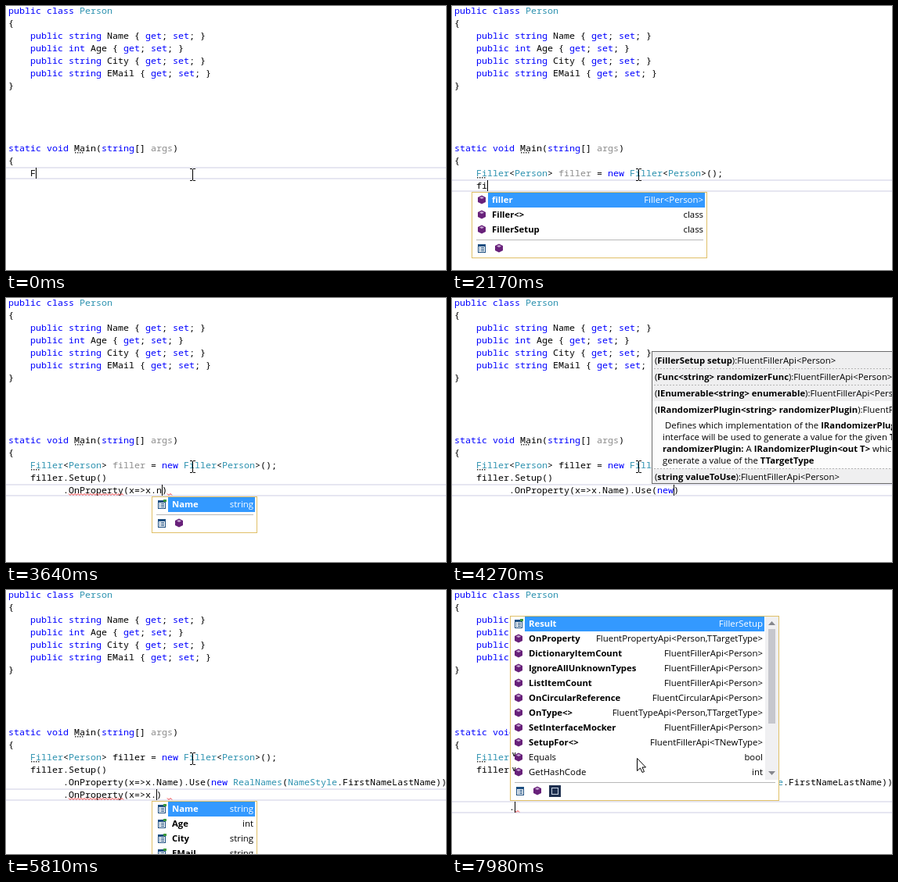
These frames come from a looping animation (562x338 px, 8000 ms). An HTML page with a canvas:

```html
<!DOCTYPE html>
<html lang="en">
<head>
<meta charset="utf-8">
<title>Typing a fluent setup</title>
<style>
html, body { margin: 0; width: 100%; height: 100%; overflow: hidden; background: #fff; }
canvas { display: block; }
</style>
</head>
<body>
<canvas id="stage" width="562" height="338"></canvas>
<script>
const ctx = document.getElementById('stage').getContext('2d');
const LOOP = 8000, CHAR = 7, LEFT = 3, LINE = 16;
const CODE_FONT = '11.667px "Noto Sans Mono", "DejaVu Sans Mono", monospace';
const UI_FONT = '11.4px "Open Sans", "Noto Sans", sans-serif';
const UI_BOLD = 'bold 11.3px "Open Sans", "Noto Sans", sans-serif';
const KEYWORDS = /^(public|class|string|int|get|set|static|void|new)$/;
const TYPES = /^(Person|Filler|RealNames|NameStyle|IntRange)$/;
const MOUSE = { x: 238, y: 216 };
const RESOLVED = 2660, USED = 4060;

const colX = col => LEFT + col * CHAR;
const lineTop = line => line * LINE - 2;

const fixedLines = [
  'public class Person', '{',
  '    public string Name { get; set; }',
  '    public int Age { get; set; }',
  '    public string City { get; set; }',
  '    public string EMail { get; set; }',
  '}', '', '', '', '',
  'static void Main(string[] args)', '{'
];

// ---- typing: each step sets one line as text before and after the caret
const steps = [];
const put = (t, line, pre, post = '') => steps.push({ t, line, pre, post });
function type(t, line, pre, typed, post = '') {
  for (let i = 1; i <= typed.length; i++) put(t + (i - 1) * 70, line, pre + typed.slice(0, i), post);
}

const IN = ' '.repeat(4), DEEP = ' '.repeat(10);
const decl = IN + 'Filler<Person> filler =';
put(0, 13, IN + 'F');
type(70, 13, IN + 'F', 'iller');
put(420, 13, IN + 'Filler<', '>');
type(490, 13, IN + 'Filler<', 'Per', '>');
put(700, 13, IN + 'Filler<Person', '>');
put(770, 13, IN + 'Filler<Person>');
type(840, 13, IN + 'Filler<Person>', ' filler =');
put(1470, 13, decl + ' ');
put(1540, 13, decl + ' ne');
put(1610, 13, decl + ' new ');
put(1680, 13, decl + ' new Filler<Person>');
put(1750, 13, decl + ' new Filler<Person>(', ')');
put(1820, 13, decl + ' new Filler<Person>()');
put(1890, 13, decl + ' new Filler<Person>();');
put(1960, 14, IN);
type(2100, 14, IN, 'fil');
put(2310, 14, IN + 'filler.');
put(2380, 14, IN + 'filler.S');
put(2450, 14, IN + 'filler.Setup');
put(2520, 14, IN + 'filler.Setup(', ')');

const onProp = DEEP + '.OnProperty(';
put(2660, 15, DEEP);
put(2730, 15, DEEP + '.');
put(2800, 15, DEEP + '.On');
put(2870, 15, DEEP + '.OnProperty');
put(2940, 15, onProp, ')');
type(3150, 15, onProp, 'x=>x', ')');
put(3570, 15, onProp + 'x=>x.', ')');
put(3640, 15, onProp + 'x=>x.n', ')');
put(3710, 15, onProp + 'x=>x.na', ')');
put(3780, 15, onProp + 'x=>x.Name', ')');
const name = onProp + 'x=>x.Name)', useName = name + '.Use(';
put(3850, 15, name);
put(3920, 15, name + '.');
put(3990, 15, name + '.U');
put(4060, 15, useName, ')');
type(4130, 15, useName, 'new ', ')');
type(4410, 15, useName + 'new ', 'Re', ')');
put(4550, 15, useName + 'new RealNames', ')');
put(4620, 15, useName + 'new RealNames(', '))');
put(4690, 15, useName + 'new RealNames(N', '))');
put(4760, 15, useName + 'new RealNames(NameStyle', '))');
put(4830, 15, useName + 'new RealNames(NameStyle.', '))');
put(4900, 15, useName + 'new RealNames(NameStyle.FirstNameLastName', '))');
put(5040, 15, useName + 'new RealNames(NameStyle.FirstNameLastName))');

put(5180, 16, DEEP);
type(5250, 16, DEEP, '.On');
put(5460, 16, onProp, ')');
type(5530, 16, onProp, 'x=>x.a', ')');
const age = onProp + 'x=>x.Age)', useAge = age + '.Use(';
put(5950, 16, onProp + 'x=>x.Age', ')');
put(6020, 16, age);
type(6090, 16, age, '.U');
put(6230, 16, age + '.Use');
put(6300, 16, useAge, ')');
type(6510, 16, useAge, 'new ', ')');
put(6930, 16, useAge + 'new I', ')');
put(7000, 16, useAge + 'new Int', ')');
put(7070, 16, useAge + 'new IntRange', ')');
put(7140, 16, useAge + 'new IntRange(', '))');
type(7210, 16, useAge + 'new IntRange(', '10,32', '))');
put(7630, 17, DEEP);
put(7770, 17, DEEP + '.');

// ---- completion lists: name | type | icon
const rows = text => text.split('\n').map(r => r.split('|'));
const api = 'FluentFillerApi<Person>';
const objectRows = '\nEquals|bool|v\nGetHashCode|int|v';
const members = rows(`Result|FillerSetup|p
OnProperty|FluentPropertyApi<Person,TTargetType>
DictionaryItemCount|${api}
IgnoreAllUnknownTypes|${api}
ListItemCount|${api}
OnCircularReference|FluentCircularApi<Person>
OnType<>|FluentTypeApi<Person,TTargetType>
SetInterfaceMocker|${api}
SetupFor<>|FluentFillerApi<TNewType>${objectRows}`);
const onMembers = members.filter(r => r[0].startsWith('On'));
const typeRows = rows('Filler<>|class\nFillerSetup|class\nFillerSetupItem|class\nFile|class\nFileAccess|enum\nFileInfo|class');
const personTypes = rows('Person|class\nPredicate<>|delegate\nProgress<>|class\nProgram|class\nProperty|class\nPath|class');
const newRows = rows('Filler<Person>|class\nPerson|class\nFillerSetup|class\nObject|class\nRandom|class\nString|class');
const fillerRows = rows('Setup|' + api + '\nCreate|Person\nFill|Person' + objectRows + '\nGetType|Type|v');
const personRows = rows('Name|string|p\nAge|int|p\nCity|string|p\nEMail|string|p');
const useRows = rows('Use|' + api + '\nDoIt|FluentPropertyApi\nIgnoreIt|' + api + objectRows + '\nGetType|Type|v\nToString|string|v');
const nameRows = rows('RealNames|class\nRandom|class\nRandomizer<>|class\nRange|class');
const intRows = rows('IntRange|class\nInt32|struct\nIntPtr|struct');

function list(t0, t1, line, col, items, opt = {}) {
  const h = items.length * 19 + 28, top = lineTop(line);
  return { t0, t1, x: colX(col) - 6, y: opt.below ? top + LINE : top - h, w: opt.w || 134, h, items, ...opt, draw: drawList };
}

// ---- signature tips; asterisks switch bold
const signatures = T => [
  'FillerSetup setup', `Func<${T}> randomizerFunc`, `IEnumerable<${T}> enumerable`,
  `IRandomizerPlugin<${T}> randomizerPlugin`, `${T} valueToUse`
].map(s => `(*${s}*):${api}`);
const pluginNote = [
  ' Defines which implementation of the *IRandomizerPlugin*',
  'interface will be used to generate a value for the given *TTargetType*',
  '*randomizerPlugin:* A *IRandomizerPlugin<out T>* which will be used to',
  'generate a value of the *TTargetType*'];
const valueNote = [
  ' Defines which static value will be used for the given *TTargetType*',
  '*valueToUse:* Value which will be used'];
const propSig = ['(*Expression<Func<Person,TTargetType>> property*, *params Expression[] more*)'];
const propNote = [
  ' Starts to configure the behaviour of a *property*',
  '*property:* The property which will be configured',
  '*more:* Some more properties which should be',
  'configured the same way',
  '*returns:* FluentPropertyApi<Person,TTargetType>'];

function tip(t0, t1, line, col, sigs, open, note) {
  const h = sigs.length * 21 + note.length * 15 + 5;
  return { t0, t1, x: colX(col), y: lineTop(line) - h, w: 420, h, sigs, open, note, draw: drawTip };
}
const nameTip = (t0, t1) => tip(t0, t1, 15, 36, signatures('string'), 3, pluginNote);
const ageTip = (t0, t1) => tip(t0, t1, 16, 35, signatures('int'), 4, valueNote);
const full = { w: 343, scroll: true };

const popups = [
  list(70, 420, 13, 4, typeRows, { below: true, w: 380 }),
  list(490, 700, 13, 11, personTypes, { below: true, w: 440 }),
  list(1610, 1680, 13, 32, newRows, { below: true, w: 264 }),
  list(2100, 2310, 14, 4, rows('filler|Filler<Person>\nFiller<>|class\nFillerSetup|class'), { below: true, w: 300 }),
  list(2310, 2450, 14, 11, fillerRows, { below: true, w: 301 }),
  list(2730, 2800, 15, 11, members, full),
  list(2800, 2870, 15, 11, onMembers, { w: 343 }),
  tip(2940, 3430, 15, 20, propSig, 0, propNote),
  list(3570, 3640, 15, 27, personRows, { below: true }),
  list(3640, 3780, 15, 27, personRows.slice(0, 1), { below: true }),
  list(3920, 4060, 15, 33, useRows, { w: 260 }),
  nameTip(4060, 4410),
  list(4410, 4550, 15, 41, nameRows, { w: 262 }),
  nameTip(4550, 5110),
  list(5250, 5320, 16, 11, members, full),
  list(5320, 5460, 16, 11, onMembers, { w: 343 }),
  tip(5460, 5740, 16, 20, propSig, 0, propNote),
  list(5810, 5880, 16, 27, personRows, { below: true }),
  list(5880, 5950, 16, 27, personRows.slice(1, 2), { below: true }),
  list(6090, 6300, 16, 32, useRows, { w: 260 }),
  ageTip(6300, 6930),
  list(6930, 7070, 16, 40, intRows, { w: 220 }),
  ageTip(7070, 7490),
  list(7840, LOOP, 17, 11, members, full)
];

// start, end, line, column, length
const squiggles = [
  [2870, 3850, 15, 11, 10], [3570, 3780, 15, 29, 1],
  [5460, 5950, 16, 11, 10], [5810, 5950, 16, 29, 1],
  [6510, 6930, 16, 36, 4], [6510, 6930, 16, 41, 1],
  [7770, LOOP, 17, 11, 1]
];
// start, end, line, columns of the brace pair
const braces = [[2520, 2660, 14, 16, 17], [4900, 5110, 15, 36, 79]];
const caretOff = [[1330, 1470], [4900, 5040]];
const during = (t, a, b) => t >= a && t < b;

// ---- drawing
function box(x, y, w, h, color) {
  ctx.fillStyle = color;
  ctx.fillRect(x, y, w, h);
}
function frame(x, y, w, h, color) {
  ctx.strokeStyle = color;
  ctx.lineWidth = 1;
  ctx.strokeRect(x + .5, y + .5, w - 1, h - 1);
}
function poly(points, fill, stroke) {
  ctx.beginPath();
  points.forEach(([x, y]) => ctx.lineTo(x, y));
  ctx.closePath();
  ctx.fillStyle = fill;
  ctx.fill();
  if (stroke) { ctx.strokeStyle = stroke; ctx.lineWidth = 1; ctx.stroke(); }
}
function label(s, x, y, color = '#000', font = UI_FONT, align = 'left') {
  ctx.font = font;
  ctx.textAlign = align;
  ctx.fillStyle = color;
  ctx.fillText(s, x, y);
}

function wordColor(word, line, t) {
  if (KEYWORDS.test(word)) return '#0000ff';
  if (TYPES.test(word)) return '#2b91af';
  if (word === 'args' || (word === 'filler' && line === 13 && t < USED)) return '#8c8c8c';
  if (word === 'filler' && t < RESOLVED) return '#f00';
  return '#000';
}
function codeLine(text, line, t) {
  for (const m of text.matchAll(/\w+|[^\w\s]+/g))
    label(m[0], colX(m.index), line * LINE + 10, wordColor(m[0], line, t), CODE_FONT);
}
function dots(x, y) {
  for (let i = 0; i < 4; i++) box(x + i * 3, y, 1.5, 1.5, '#333');
}
function squiggle(x, y, w) {
  ctx.beginPath();
  for (let i = 0; i <= w; i += 2) ctx.lineTo(x + i, y + (i % 4 ? 2 : 0));
  ctx.strokeStyle = '#f03030';
  ctx.lineWidth = 1;
  ctx.stroke();
}

function cube(x, y) {
  poly([[x, y - 5.5], [x + 5, y - 3], [x + 5, y + 3], [x, y + 5.5], [x - 5, y + 3], [x - 5, y - 3]], '#68217a');
  poly([[x, y - 4], [x + 3, y - 2.5], [x, y - 1], [x - 3, y - 2.5]], '#c9a9d3');
}
function sheet(x, y) {
  box(x - 5, y - 5, 10, 11, '#fff');
  frame(x - 5, y - 5, 10, 11, '#1c4e80');
  box(x - 5, y - 5, 10, 3, '#1c4e80');
  for (let i = 0; i < 3; i++) {
    box(x - 3, y - 1 + i * 2, 1, 1, '#1c4e80');
    box(x - 1, y - 1 + i * 2, 4, 1, '#1c4e80');
  }
}
function rowIcon(kind, x, y) {
  if (kind === 'p') {
    sheet(x, y);
    box(x + 2, y - 6, 4, 3, '#3c9a3c');
    return;
  }
  cube(x, y);
  if (kind === 'v') label('v', x - 8, y - 1, '#222', 'bold 8px "Open Sans", sans-serif');
}

function drawList(p) {
  const { x, y, w, h, items, scroll } = p;
  const pad = scroll ? 0 : 2, right = x + w - (scroll ? 20 : 4);
  box(x, y, w, h, '#fff');
  frame(x, y, w + 1, h, '#e0c068');
  items.forEach(([text, kind, icon], i) => {
    const cy = y + 10 + i * 19, ink = i ? '#000' : '#fff';
    if (!i) box(x + 19 + pad, y + 1, right + 2 - x - 19 - pad, 19, '#3399ff');
    rowIcon(icon, x + 11 + pad, cy);
    label(text, x + 24 + pad, cy + 4, ink, icon === 'v' ? UI_FONT : UI_BOLD);
    label(kind, right, cy + 4, ink, UI_FONT, 'right');
  });
  const foot = y + items.length * 19;
  box(x + 6, foot + 4, w - 10, 1, '#b8b8b8');
  sheet(x + 13, foot + 15);
  cube(x + 35, foot + 15);
  if (!scroll) return;
  box(x + 50, foot + 8, 15, 15, '#1f3050');
  frame(x + 53, foot + 11, 9, 9, '#c8d4e4');
  const sx = x + w - 17;
  box(sx, y + 1, 17, items.length * 19, '#f0f0f2');
  box(sx + 4, y + 17, 9, 121, '#c6c7cd');
  const up = y + 9, down = y + items.length * 19 - 7, mid = sx + 8.5;
  poly([[mid - 4.5, up + 3], [mid + 4.5, up + 3], [mid, up - 2]], '#85868c');
  poly([[mid - 4.5, down - 3], [mid + 4.5, down - 3], [mid, down + 2]], '#85868c');
}

function rich(text, x, y) {
  text.split('*').forEach((part, i) => {
    label(part, x, y, '#000', i % 2 ? UI_BOLD : UI_FONT);
    x += ctx.measureText(part).width;
  });
}
function drawTip({ x, y, w, h, sigs, open, note }) {
  box(x, y, w, h, '#efeff0');
  let cy = y + 12;
  sigs.forEach((sig, i) => {
    const tall = i === open ? note.length * 15 + 5 : 0;
    if (tall) box(x, cy - 11, w, Math.min(21 + tall, y + h - cy + 11), '#fcfcfc');
    rich(sig, x + 4, cy + 3.5);
    cy += 21;
    if (tall) {
      note.forEach((s, n) => rich(s, x + 14, cy + n * 15 + 3));
      cy += tall;
    }
    if (i < sigs.length - 1)
      for (let dx = 3; dx < w; dx += 4) box(x + dx, cy - 11, 2, 1, '#b4b4b4');
  });
  frame(x, y, w, h, '#6c6c6c');
}

function drawMouse(overList) {
  if (overList) {
    const shape = [[0, 0], [0, 16], [4, 12.5], [6.5, 18], [9, 17], [6.5, 11.5], [11, 11.5]];
    poly(shape.map(([x, y]) => [x + 236.5, y + 215.5]), '#fff', '#000');
    return;
  }
  const { x, y } = MOUSE;
  box(x, y - 7, 1, 14, '#000');
  for (const cy of [y - 8, y + 7]) {
    box(x - 3, cy, 3, 1, '#000');
    box(x + 1, cy, 3, 1, '#000');
  }
}

function draw(t) {
  box(0, 0, 562, 338, '#fff');
  const text = fixedLines.slice();
  let now = steps[0];
  for (const s of steps) {
    if (s.t > t) continue;
    text[s.line] = s.pre + s.post;
    now = s;
  }
  const top = lineTop(now.line);
  box(0, top, 562, 2, '#e6e6f1');
  box(0, top + 14, 562, 2, '#e6e6f1');

  for (const [a, b, line, ...cols] of braces)
    if (during(t, a, b)) cols.forEach(c => box(colX(c), lineTop(line) + 2, CHAR, 12, '#dbe6d4'));
  text.forEach((s, i) => codeLine(s, i, t));
  dots(88, 187);
  if (t >= 1960) dots(32, 219);
  for (const [a, b, line, col, len] of squiggles)
    if (during(t, a, b)) squiggle(colX(col), lineTop(line) + 12.5, len * CHAR);
  if (!caretOff.some(([a, b]) => during(t, a, b)))
    box(colX(now.pre.length), top + 1, 1, 14, '#000');

  const shown = popups.filter(p => during(t, p.t0, p.t1));
  shown.forEach(p => p.draw(p));
  drawMouse(shown.some(p => p.items && during(MOUSE.x, p.x, p.x + p.w) && during(MOUSE.y, p.y, p.y + p.h)));
}

const start = performance.now();
function tick() {
  draw((performance.now() - start) % LOOP);
  requestAnimationFrame(tick);
}
tick();
</script>
</body>
</html>
```
